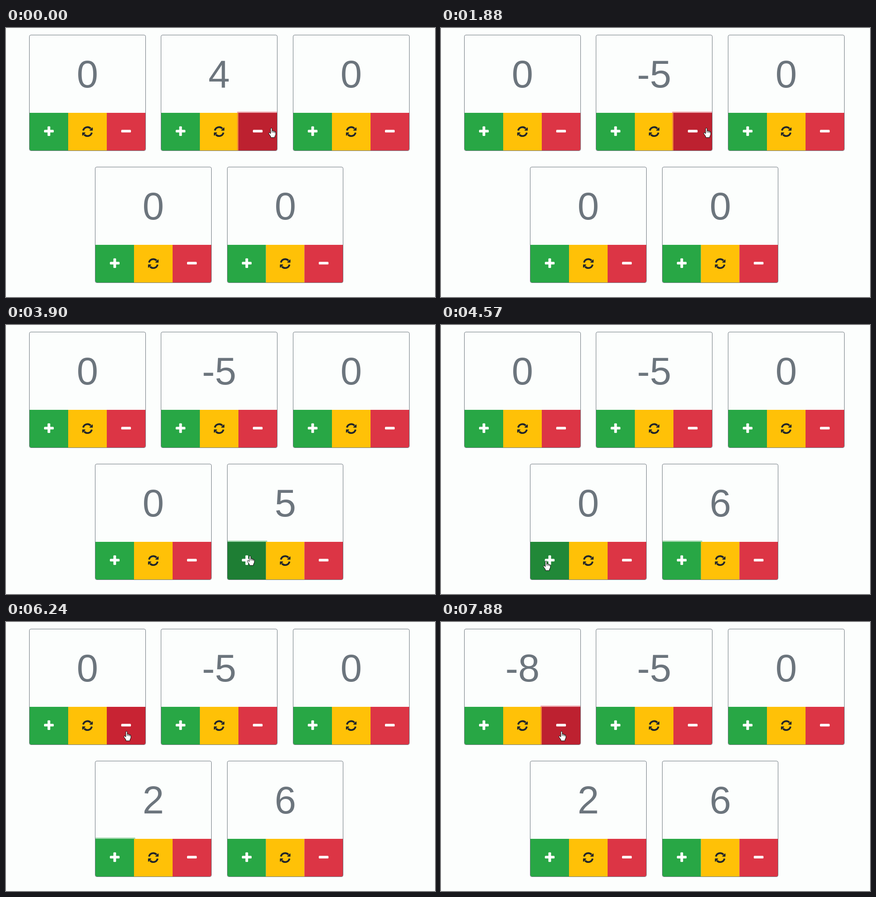
Recreate the animation shown at these times as an HTML page. Size 945 by 593 pixels, loop 8000 ms.

```html
<!DOCTYPE html>
<html lang="en">
<head>
<meta charset="utf-8">
<title>Counters</title>
<style>
  html, body { margin: 0; width: 100%; height: 100%; overflow: hidden; background: #fcfefd; }
  svg { display: block; width: 945px; height: 593px; }
  text { font: 85px "Liberation Sans", Arial, sans-serif; fill: #6c757d; text-anchor: middle; }
</style>
</head>
<body>
<svg viewBox="0 0 945 593">
  <defs>
    <clipPath id="inner"><rect x=".5" y=".5" width="255" height="254" rx="3"/></clipPath>
    <rect id="minus" x="-10.7" y="-3.9" width="21.4" height="5.9" rx="1.5"/>
    <g id="plus">
      <use href="#minus"/>
      <use href="#minus" transform="rotate(90 0 -.95)"/>
    </g>
    <g id="half">
      <path d="M-9.5 -2.3A9.75 9.75 0 0 1 7.2 -6.6" fill="none" stroke="#212529" stroke-width="3.9"/>
      <path d="M10.7 -8V-2.9H5.6Z" stroke="#212529" stroke-width="1.9" stroke-linejoin="round"/>
    </g>
    <g id="reset">
      <use href="#half"/>
      <use href="#half" transform="rotate(180)"/>
    </g>
  </defs>
  <g id="cards"></g>
  <g id="pointer" fill="#fff" stroke="#000" stroke-linejoin="round">
    <g id="hand">
      <path d="M-1.6 1.5Q-1.5 0 0 0Q1.5 0 1.6 1.5V6Q4.3 5 4.6 7Q7 6.2 7.4 8Q9.6 7.6 9.6 9.6V14Q9.4 16 7.6 18V21H-1.4V18.5L-5 13.5Q-6.6 11 -5.2 10.2Q-3.8 9.6 -1.6 12.4Z"/>
      <path d="M1.6 6V10M4.6 7V10.5M7.4 8V11" fill="none"/>
    </g>
    <path id="arrow" d="M0 0V16.5L3.8 13L6.3 18.8L8.8 17.7L6.3 12H11.5Z"/>
  </g>
</svg>
<script>
const LOOP = 8000;
const TICK = 133.3;        // the picture changes on this beat
const PITCH = 290.5;       // distance between cards
const BUTTON_TOP = 171.5;
const BUTTON_HEIGHT = 83;
const NS = "http://www.w3.org/2000/svg";
const $ = id => document.getElementById(id);

const kinds = [
  { icon: "plus", ink: "#fff", base: "#28a745", hover: "#218838", active: "#1e7e34", glow: "#48b461", step: 1 },
  { icon: "reset", ink: "#212529", base: "#ffc107", hover: "#e0a800", active: "#d39e00", glow: "#deaa0c", step: 0 },
  { icon: "minus", ink: "#fff", base: "#dc3545", hover: "#c82333", active: "#bd2130", glow: "#e15361", step: -1 }
];

// The pointer goes from button to button: it sets off at `go` and clicks from `first` on.
// `pace` is the number of beats per click, `lead` the phase of the rounding.
const visits = [
  { card: 1, button: 2, x: 584.5, y: 220.5, go: 0, steps: 1, bow: 0, first: 280, clicks: 9, pace: 1.5, lead: 0.5 },
  { card: 4, button: 0, x: 537.5, y: 509, go: 2290, steps: 4, bow: 58, first: 3100, clicks: 6, pace: 1.5, lead: 0.5 },
  { card: 3, button: 0, x: 226.5, y: 520.5, go: 4300, steps: 4, bow: 0, first: 5160, clicks: 2, pace: 1.5, lead: 0.5 },
  { card: 0, button: 2, x: 265.5, y: 241, go: 5690, steps: 5, bow: 0, first: 6660, clicks: 8, pace: 4 / 3, lead: 0 }
];
const pressTime = visit => visit.first - 140;

function add(parent, tag, attrs) {
  const el = document.createElementNS(NS, tag);
  for (const key in attrs) el.setAttribute(key, attrs[key]);
  return parent.appendChild(el);
}

function makeCard(column, row, start) {
  const edge = 51.3 + PITCH * column;
  const x = Math.floor(edge) + 0.5, y = 15.5 + 291 * row;
  const width = Math.floor(edge + 256.8) - x - 0.5;
  const size = (width - 1) / 3;
  const root = add($("cards"), "g", { transform: `translate(${x} ${y})` });
  const label = add(root, "text", { x: 128, y: 115.3 });
  const panel = add(root, "g", { "clip-path": "url(#inner)" });

  const buttons = kinds.map((kind, i) => {
    const left = 0.5 + size * i;
    const ring = add(panel, "rect", {
      x: left - 2.7, y: BUTTON_TOP - 2.7, width: size + 5.4, height: 90, rx: 0.5,
      fill: kind.glow, "fill-opacity": 0.5
    });
    const face = add(panel, "rect", { x: left, y: BUTTON_TOP, width: size, height: BUTTON_HEIGHT });
    add(panel, "use", {
      href: "#" + kind.icon, fill: kind.ink, transform: `translate(${left + size / 2} 212.8)`
    });
    const contains = (px, py) => {
      const dx = px - x - left, dy = py - y - BUTTON_TOP;
      return dx >= 0 && dx < size && dy >= 0 && dy < BUTTON_HEIGHT;
    };
    return { kind, ring, face, contains };
  });

  add(root, "rect", { width, height: 255, rx: 3.4, fill: "none", stroke: "#6c757d" });
  return { label, buttons, start };
}

const cards = [
  makeCard(0, 0, 0), makeCard(1, 0, 4), makeCard(2, 0, 0),
  makeCard(0.5, 1, 0), makeCard(1.5, 1, 0)
];

function clicksBy(visit, t) {
  let n = 0;
  while (n < visit.clicks && t >= visit.first + TICK * Math.floor(visit.pace * n + visit.lead)) n++;
  return n;
}

function pointerAt(t) {
  const i = visits.filter(visit => visit.go <= t).length - 1;
  const to = visits[i], from = visits[i - 1] || to;
  const p = Math.min(1, (Math.floor((t - to.go) / TICK) + 1) / to.steps);
  const eased = 1 - (1 - p) ** 3;
  return {
    x: from.x + (to.x - from.x) * eased + to.bow * Math.sin(Math.PI * eased),
    y: from.y + (to.y - from.y) * eased
  };
}

function render(t) {
  const { x, y } = pointerAt(t);
  const focus = visits.filter(visit => pressTime(visit) <= t).pop() || visits[0];
  let overButton = false;

  cards.forEach((card, c) => {
    card.label.textContent = visits
      .filter(visit => visit.card === c)
      .reduce((sum, visit) => sum + kinds[visit.button].step * clicksBy(visit, t), card.start);

    card.buttons.forEach(({ kind, ring, face, contains }, b) => {
      const hover = contains(x, y);
      const focused = focus.card === c && focus.button === b;
      overButton = overButton || hover;
      face.setAttribute("fill", !hover ? kind.base : focused ? kind.active : kind.hover);
      ring.style.display = focused ? "" : "none";
    });
  });

  $("pointer").setAttribute("transform", `translate(${x} ${y})`);
  $("hand").style.display = overButton ? "" : "none";
  $("arrow").style.display = overButton ? "none" : "";
}

const begin = performance.now();
function tick() {
  render((performance.now() - begin) % LOOP);
  requestAnimationFrame(tick);
}
tick();
</script>
</body>
</html>
```
